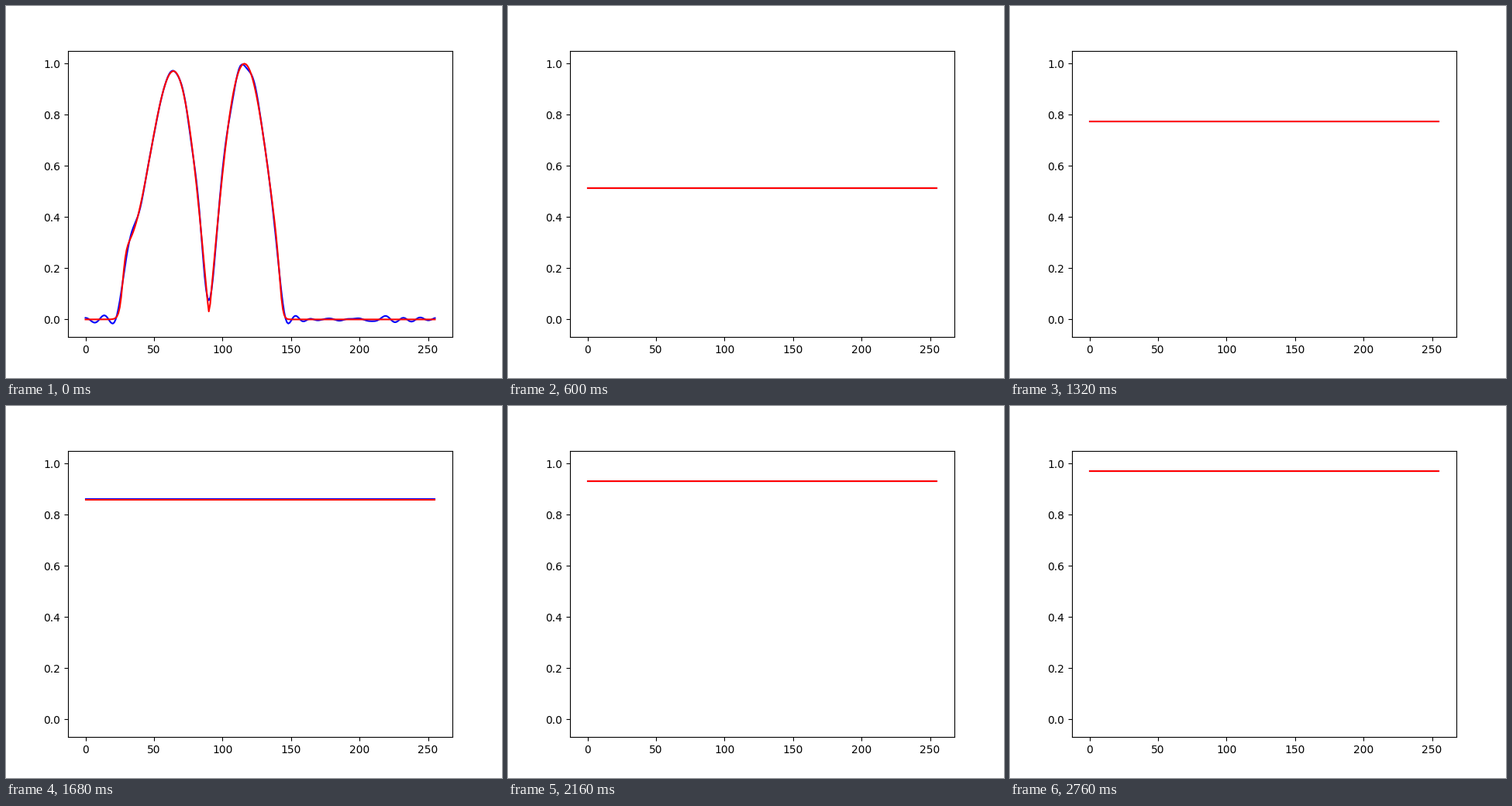
Write a matplotlib script that moves like this. It is 640 px wide and 480 px high and loops after 6390 ms.

```python
import numpy as np
import matplotlib.pyplot as plt
from matplotlib.animation import FuncAnimation

INTERVAL = 30          # ms per tick
TICKS = 213            # one loop: 6390 ms
TICKS_PER_STEP = 2
LAST_STEP = 46         # the picture rests after this step
MODE_DECAY = 0.07      # damping of the first spatial mode per step
ERROR_DECAY = 0.1      # shrinking of the prediction error per step
KEPT_MODES = 20        # resolution of the predicted curve

x = np.arange(256)


def wave_basis(pos):
    """Constant plus the first and third harmonic of the domain."""
    angle = 2 * np.pi * np.asarray(pos, float) / len(x)
    return np.stack([np.ones_like(angle), np.sin(angle), np.cos(angle),
                     np.sin(3 * angle), np.cos(3 * angle)], axis=-1)


def initial_state():
    """Rectified two-wave sum through a few key points, in a soft window."""
    keys = [(28, 0.31), (35, 0.34), (50, 0.725), (64.5, 0.967), (71, 0.90),
            (90.2, 0), (109, -0.927), (115.4, -1), (122, -0.925),
            (139.7, -0.33)]
    pos, height = np.transpose(keys)
    weights = np.linalg.lstsq(wave_basis(pos), height, rcond=None)[0]
    wave = wave_basis(x) @ weights
    window = 0.5 * (np.tanh((x - 27.3) / 2.56) - np.tanh((x - 142.5) / 2.56))
    state = np.hypot(wave, 0.03) * window
    return state / state.max()


def initial_prediction(state):
    """Band-limited copy of the state with a small seeded ripple."""
    spectrum = np.fft.rfft(state)
    spectrum[KEPT_MODES:] = 0
    rng = np.random.default_rng(4)
    noise = np.fft.rfft(rng.normal(size=len(x)))
    noise[:8] = 0
    noise[28:] = 0
    ripple = np.fft.irfft(noise, len(x))
    return np.fft.irfft(spectrum, len(x)) + 0.005 * ripple / ripple.std()


truth0 = initial_state()
error0 = initial_prediction(truth0) - truth0
spectrum0 = np.fft.rfft(truth0 - truth0.mean())
modes = np.arange(len(spectrum0))


def mean_level(step):
    """Logistic growth of the average concentration."""
    t = step - 28
    return 1 / (1 + np.exp(-(1.817 + 0.097 * t - 4.5e-5 * t * t)))


def curves(step):
    if step == 0:
        return truth0, truth0 + error0
    damping = MODE_DECAY ** (modes ** 2 * float(step))
    truth = mean_level(step) + np.fft.irfft(spectrum0 * damping, len(x))
    return truth, truth + error0 * ERROR_DECAY ** step + 0.0003


fig, ax = plt.subplots(figsize=(6.4, 4.8), dpi=100)
predicted_line, = ax.plot(x, truth0, color="blue", lw=1.5)
truth_line, = ax.plot(x, truth0, color="red", lw=1.5)
ax.set_xlim(-12.75, 267.75)
ax.set_ylim(-0.069, 1.051)


def update(tick):
    truth, predicted = curves(min(tick // TICKS_PER_STEP, LAST_STEP))
    truth_line.set_ydata(truth)
    predicted_line.set_ydata(predicted)
    return predicted_line, truth_line


anim = FuncAnimation(fig, update, frames=TICKS, interval=INTERVAL,
                     repeat=True, repeat_delay=0)
plt.show()
```
